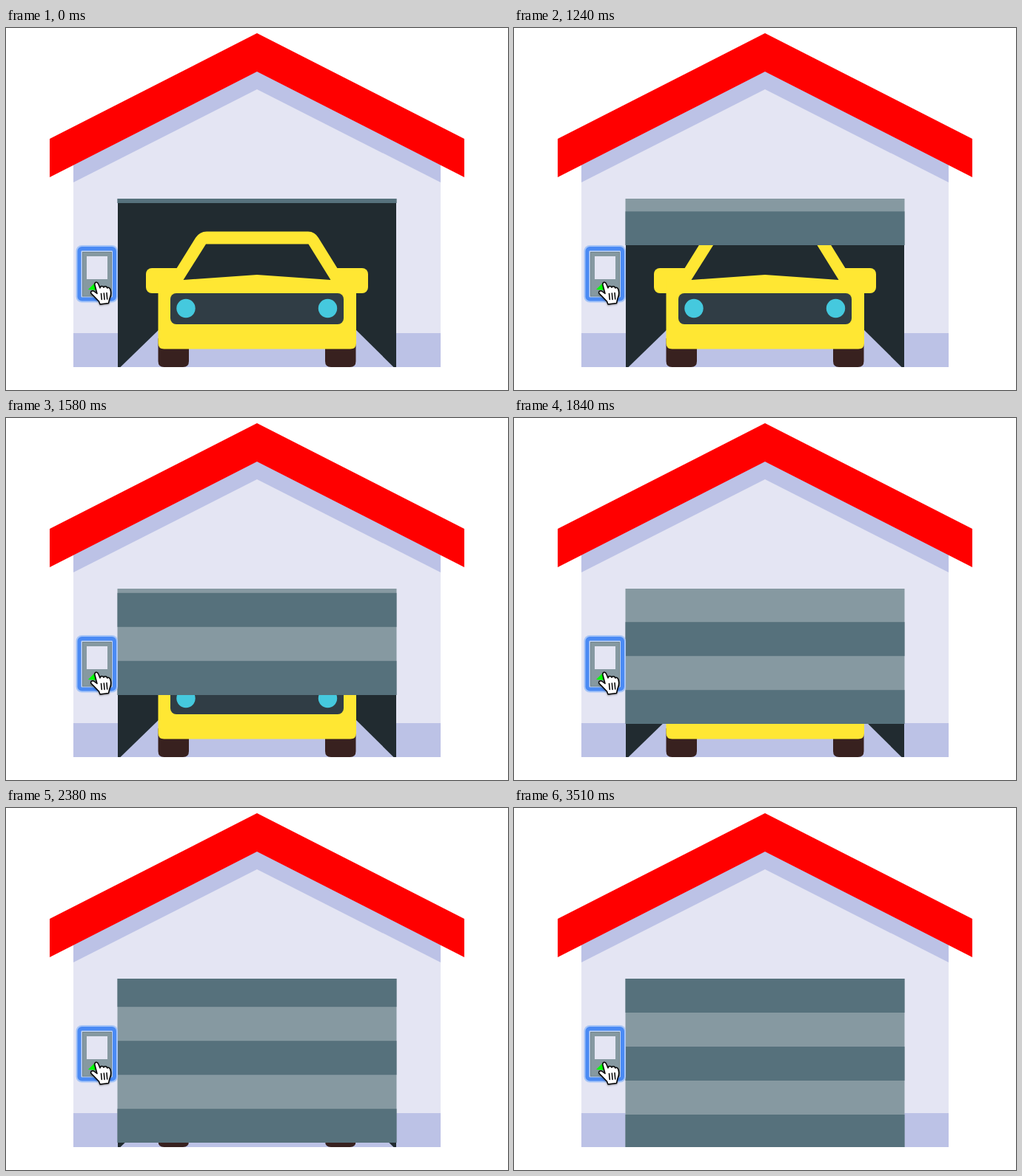
These frames come from a looping animation (678x490 px, 3540 ms). An HTML page without scripts:

```html
<!DOCTYPE html>
<html lang="en">
<head>
<meta charset="utf-8">
<title>Garage door</title>
<style>
  html, body { margin: 0; width: 100%; height: 100%; overflow: hidden; background: #fff; }
  svg { display: block; width: 678px; height: 490px; }

  .roof { fill: #f00; }
  .shade { fill: #bcc2e6; }
  .wall { fill: #e4e5f3; }
  .inside { fill: #212b30; }
  .car { fill: #ffe733; }
  .tyre { fill: #38211f; }
  .grille { fill: #303d45; }
  .lamp { fill: #45c9de; }
  .light { fill: #8699a1; }
  .dark { fill: #56717c; }

  /* settle open, wait, then roll down; the loop cuts back to open */
  .door { animation: roll 3540ms linear infinite; }
  @keyframes roll {
    0% { transform: translateY(-224px); animation-timing-function: ease-out; }
    5.65% { transform: translateY(-225.4px); }
    24.8% { transform: translateY(-225.4px); animation-timing-function: ease; }
    80.34%, 100% { transform: translateY(0); }
  }
</style>
</head>
<body>
<svg viewBox="0 0 678 490">
  <defs>
    <clipPath id="doorway"><rect x="150.5" y="231" width="377" height="228"/></clipPath>
    <path id="tyre" d="M0 420h41.500v31q0 8-8 8h-25.500q-8 0-8-8z"/>
  </defs>

  <!-- house -->
  <path class="shade" d="M91 180 339 50 587 180V459H91z"/>
  <path class="wall" d="M91 209 339 83 587 209V413H91z"/>
  <path class="roof" d="M59 150 339 7 619 150V202L339 59 59 202z"/>
  <path class="inside" d="M151 231H527V459H151z"/>
  <path class="shade" d="M154.500 459 211 404H468L523.500 459z"/>

  <!-- car -->
  <use href="#tyre" class="tyre" x="205.500"/>
  <use href="#tyre" class="tyre" x="431"/>
  <g class="car">
    <path d="M230 326 256 284Q261.500 275.500 271 275.500H408Q417 275.500 422 284L448 326V345H230z"/>
    <rect x="189" y="325" width="300" height="34" rx="8"/>
    <path d="M205.500 340H473V426.500q0 8-8 8H213.500q-8 0-8-8z"/>
  </g>
  <path class="inside" d="M270 292.500H408.500L438.500 341 339 334 239.500 341z"/>
  <rect class="grille" x="222" y="359" width="234" height="42" rx="8"/>
  <circle class="lamp" cx="243" cy="379.500" r="12.700"/>
  <circle class="lamp" cx="434.500" cy="379.500" r="12.700"/>

  <!-- door -->
  <g clip-path="url(#doorway)">
    <g class="door">
      <rect class="light" x="150.500" y="0" width="377" height="461"/>
      <path class="dark" d="M150.500 231h377v46h-377zm0 92h377v46h-377zm0 92h377v46h-377z"/>
    </g>
  </g>

  <!-- wall switch -->
  <rect x="94.500" y="294" width="56.500" height="77.500" rx="8" fill="#a5c4f7"/>
  <rect x="96.500" y="296" width="52.500" height="73.500" rx="6" fill="#4a8af4"/>
  <rect x="101.500" y="301.500" width="42.500" height="63" rx="1" fill="#c3d3ee"/>
  <rect x="103" y="303" width="40" height="60.500" fill="#6f838c"/>
  <rect class="light" x="104" y="304" width="38" height="58.500"/>
  <rect class="wall" x="109" y="309" width="28" height="31"/>
  <path fill="#0f0" d="M111 354 121 344 125 355z"/>

  <!-- pointer -->
  <g stroke="#000" stroke-width="1.500" stroke-linejoin="round" stroke-linecap="round"
     style="filter: drop-shadow(0 1px 1px #0006)">
    <path fill="#fff" d="M120 348C119 343.500 123.500 343 124.700 346.500L127 352C127.500 348.800 131 349 132 351.300C132.500 349 136 349.500 136.800 352C138 350.500 140.500 351.500 141 354.500C142.500 360 141.500 363 140 366L138.500 372.500 127 374 125.500 370C122 367 119 363 115.500 359.800C113 357 116.500 354.500 119 356.500L123 359.500z"/>
    <path fill="none" d="M128.500 359.500 129.300 367.500M132.300 359 133 367.500M136 358.500 136.700 367"/>
  </g>
</svg>
</body>
</html>
```
